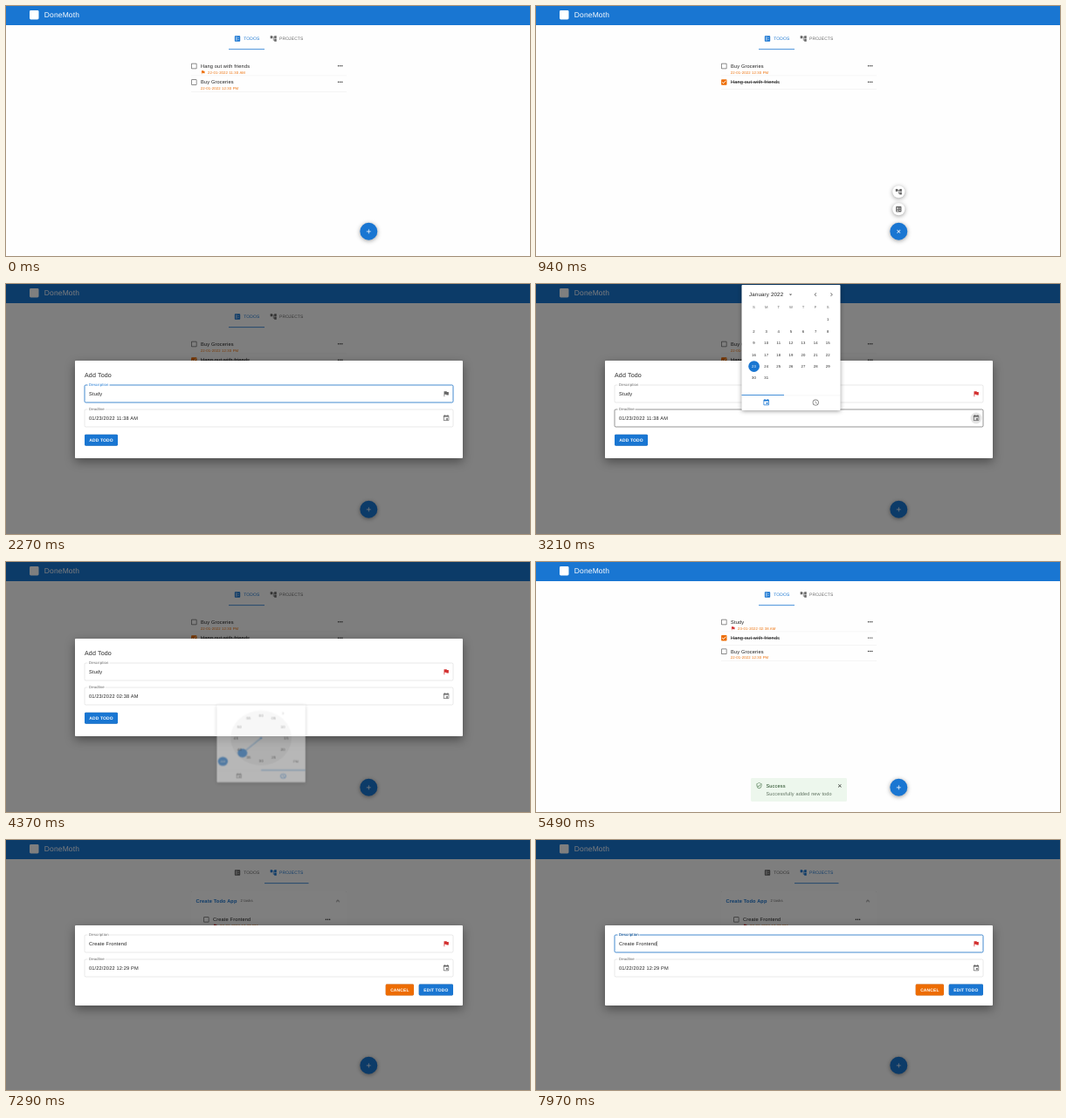
Animation, 600 px wide and 287 px high, one loop 8000 ms. Source, as an HTML page:

```html
<!DOCTYPE html>
<html lang="en">
<head>
<meta charset="utf-8">
<title>Todo app demo</title>
<style>
html, body { margin: 0; width: 100%; height: 100%; overflow: hidden; background: #fefefe; }
svg { display: block; width: 100vw; height: 100vh; font-family: "Liberation Sans", Arial, sans-serif; letter-spacing: .0094em; text-rendering: geometricPrecision; }
.caps { letter-spacing: .0286em; }
.small { letter-spacing: .033em; }
.card { filter: drop-shadow(0 .5px .7px rgba(0,0,0,.3)); }
.float { filter: drop-shadow(0 1.5px 2.5px rgba(0,0,0,.4)); }
.modal { filter: drop-shadow(0 4px 6px rgba(0,0,0,.4)); }
</style>
</head>
<body>
<svg id="stage" viewBox="0 0 600 287"></svg>
<script>
const LOOP = 8000;
const BLUE = '#1976d2', ORANGE = '#ed6c02', RED = '#d32f2f';
const INK = 'rgba(0,0,0,.87)', GREY = 'rgba(0,0,0,.6)', LINE = 'rgba(0,0,0,.23)';

const ICONS = {
  ballot: 'M13 9.5h5v-2h-5zm0 7h5v-2h-5zm6 4.5H5a2 2 0 01-2-2V5a2 2 0 012-2h14a2 2 0 012 2v14a2 2 0 01-2 2zM6 11h5V6H6zm1-4h3v3H7zM6 18h5v-5H6zm1-4h3v3H7z',
  tree: 'M22 11V3h-7v3H9V3H2v8h7V8h2v10h4v3h7v-8h-7v3h-2V8h2v3z',
  flag: 'M14.4 6 14 4H5v17h2v-7h5.6l.4 2h7V6z',
  event: 'M17 12h-5v5h5zM16 1v2H8V1H6v2H5a2 2 0 00-2 2v14a2 2 0 002 2h14a2 2 0 002-2V5a2 2 0 00-2-2h-1V1zm3 18H5V8h14z',
  clock: 'M12 2a10 10 0 100 20 10 10 0 000-20zm0 18a8 8 0 110-16 8 8 0 010 16zm.5-13H11v6l5.25 3.15.75-1.23-4.5-2.67z',
  edit: 'M3 17.25V21h3.75L17.81 9.94l-3.75-3.75zM20.71 7.04a1 1 0 000-1.41l-2.34-2.34a1 1 0 00-1.41 0l-1.83 1.83 3.75 3.75z',
  trash: 'M6 19a2 2 0 002 2h8a2 2 0 002-2V7H6zM19 4h-3.5l-1-1h-5l-1 1H5v2h14z',
  plus: 'M19 13h-6v6h-2v-6H5v-2h6V5h2v6h6z',
  box: 'M19 5v14H5V5h14m0-2H5a2 2 0 00-2 2v14a2 2 0 002 2h14a2 2 0 002-2V5a2 2 0 00-2-2z',
  checked: 'M19 3H5a2 2 0 00-2 2v14a2 2 0 002 2h14a2 2 0 002-2V5a2 2 0 00-2-2zm-9 14l-5-5 1.41-1.41L10 14.17l7.59-7.59L19 8z',
  shield: 'M12 1 3 5v6c0 5.6 3.8 10.7 9 12 5.2-1.3 9-6.4 9-12V5zm7 10c0 4.5-3 8.7-7 9.9-4-1.2-7-5.4-7-9.9V6.3l7-3.1 7 3.1zM7.4 11.6 6 13l4 4 8-8-1.4-1.4L10 14.2z',
  more: 'M6 10a2 2 0 100 4 2 2 0 000-4zm12 0a2 2 0 100 4 2 2 0 000-4zm-6 0a2 2 0 100 4 2 2 0 000-4z',
  chevron: 'M7.4 8.6 12 13.2l4.6-4.6L18 10l-6 6-6-6z',
  drop: 'M7 10l5 5 5-5z',
  close: 'M19 6.4 17.6 5 12 10.6 6.4 5 5 6.4l5.6 5.6L5 17.6 6.4 19l5.6-5.6 5.6 5.6 1.4-1.4-5.6-5.6z'
};

// All positions are centres for icons, left/centre-line for text.
const icon = (name, x, y, fill = GREY, size = 8.47, turn = 0, cls = '') =>
  `<path class="${cls}" d="${ICONS[name]}" fill="${fill}" transform="translate(${x} ${y}) rotate(${turn}) scale(${size / 24}) translate(-12 -12)"/>`;
const text = (str, x, y, size = 5.65, fill = INK, attrs = '') =>
  `<text x="${x}" y="${y + size * .35}" font-size="${size}" fill="${fill}" ${attrs}>${str}</text>`;
const mid = 'text-anchor="middle"', bold = 'font-weight="bold"', caps = 'class="caps"';
const rect = (x, y, w, h, fill, attrs = '') =>
  `<rect x="${x}" y="${y}" width="${w}" height="${h}" fill="${fill}" ${attrs}/>`;
const disc = (x, y, r, fill, attrs = '') => `<circle cx="${x}" cy="${y}" r="${r}" fill="${fill}" ${attrs}/>`;
const group = (cls, ...parts) => `<g class="${cls}">${parts.join('')}</g>`;

// Keyframes keyed by milliseconds; each track becomes a class of the same name.
const rules = [];
function track(name, stops, ease = 'linear') {
  const times = Object.keys(stops);
  if (!stops[LOOP]) stops[LOOP] = stops[times[times.length - 1]];
  const frames = Object.entries(stops).map(([ms, css]) => `${ms * 100 / LOOP}%{${css}}`).join('');
  rules.push(`@keyframes ${name}{${frames}}.${name}{animation:${name} ${LOOP}ms ${ease} infinite}`);
}
const during = (name, from, to = LOOP) => track(name, {
  0: `opacity:${from ? 0 : 1}`, [from]: 'opacity:1', [to]: `opacity:${to < LOOP ? 0 : 1}`
}, 'step-end');
const fade = (name, a, b, c = LOOP, d = LOOP) => track(name, {
  0: 'opacity:0', [a]: 'opacity:0', [b]: 'opacity:1', [c]: 'opacity:1', [d]: `opacity:${c < LOOP ? 0 : 1}`
});

during('todos', 0, 5620);
during('projects', 5620);
track('underline', { 0: 'x:255px;width:41px', 5620: 'x:255px;width:41px', 5780: 'x:296px;width:50.5px' }, 'ease-in-out');
during('listStart', 0, 90);
during('listChecked', 90, 280);
during('listSorted', 280, 4880);
during('listAdded', 4880);
fade('snack', 4960, 5130, 5530, 5600);

const OPEN = 'transform:scale(1)', SHUT = 'transform:scale(0)';
track('spin', { 0: 'transform:rotate(0)', 560: 'transform:rotate(0)', 720: 'transform:rotate(45deg)', 1290: 'transform:rotate(45deg)', 1470: 'transform:rotate(0)' });
track('dialTodo', { 0: SHUT, 560: SHUT, 700: OPEN, 1330: OPEN, 1470: SHUT });
track('dialProject', { 0: SHUT, 610: SHUT, 770: OPEN, 1260: OPEN, 1410: SHUT });

track('backdrop', {
  0: 'opacity:0', 1240: 'opacity:0', 1370: 'opacity:.37', 1470: 'opacity:.5', 4710: 'opacity:.5',
  4900: 'opacity:0', 6990: 'opacity:0', 7220: 'opacity:.5'
});
fade('addDialog', 1230, 1365, 4710, 4890);
fade('editDialog', 6990, 7210);
const REST = 'transform:translate(95px,128px) scale(1)', LIFT = 'transform:translate(95px,117.2px) scale(.75)';
track('label', {
  0: `${REST};fill:${GREY}`, 1560: `${REST};fill:${GREY}`, 1700: `${LIFT};fill:${BLUE}`,
  2390: `${LIFT};fill:${BLUE}`, 2420: `${LIFT};fill:${GREY}`
});
during('notch', 1620);
during('focusAdd', 1560, 2400);
during('focusEdit', 7600);
during('caretStart', 1600, 1720);
during('caretEnd', 1930, 2100);
const TYPED = [1720, 1760, 1820, 1870, 1930, LOOP];
TYPED.slice(0, -1).forEach((ms, i) => during(`typed${i}`, ms, TYPED[i + 1]));
track('priority', { 0: `fill:${GREY}`, 2560: `fill:${RED}` }, 'step-end');
during('picking', 2900, 4290);
during('timeOld', 0, 3900);
during('timeNew', 3900);

const TINY = 'opacity:0;transform:scale(.75,.5625)', FULL = 'opacity:1;transform:scale(1)';
track('calendar', { 0: TINY, 3080: TINY, 3200: FULL, 3639: FULL, 3640: TINY });
track('clock', { 0: TINY, 3639: TINY, 3640: FULL, 4300: FULL, 4370: 'opacity:.45;transform:scale(.9,.81)', 4470: TINY });
during('hours', 3640, 4060);
during('minutes', 4060, 4500);
track('hand', { 0: 'transform:rotate(330deg)', 3900: 'transform:rotate(60deg)', 4060: 'transform:rotate(228deg)' }, 'step-end');

const UNFOLD = 'cubic-bezier(.4,0,.2,1)';
track('cardFold', { 0: 'height:17px', 5820: 'height:17px', 6120: 'height:96px' }, UNFOLD);
track('headShift', { 0: 'transform:translateY(-2.8px)', 5820: 'transform:translateY(-2.8px)', 6120: 'transform:none' }, UNFOLD);
track('nextShift', { 0: 'transform:translateY(-84px)', 5820: 'transform:translateY(-84px)', 6120: 'transform:none' }, UNFOLD);
const DOWN = 'transform:rotate(0)', UP = 'transform:rotate(180deg)';
track('flip', { 0: DOWN, 5820: DOWN, 6000: UP });
during('hoverMore', 6260, 6940);
track('menu', { 0: TINY, 6460: TINY, 6555: FULL, 6940: FULL, 7010: TINY });

rules.push(
  '.spin{transform-origin:415.3px 258.8px}', '.dialTodo{transform-origin:415.3px 233.3px}',
  '.dialProject{transform-origin:415.3px 213.3px}', '.calendar{transform-origin:292px 144px}',
  '.clock{transform-origin:292px 164px}', '.hand{transform-origin:292px 211px}',
  '.flip{transform-origin:380px 70px}', '.menu{transform-origin:400px 98px}'
);

const due = (x, y, date, flag) => (flag ? icon('flag', x + 2.8, y, flag, 5.6) : '') +
  text(date, flag ? x + 8.3 : x, y, 4.24, ORANGE, 'class="small"');

function task(x, y, name, { done, flag, date, moreX = 382.7 } = {}) {
  const struck = done ? rect(x + 7.7, y - .1, 54.4, .45, INK) : '';
  return icon(done ? 'checked' : 'box', x, y, done ? ORANGE : GREY) + text(name, x + 7.7, y) + struck +
    (date ? due(x + 7.5, y + 7.2, date, flag) : '') + icon('more', moreX, y - .2, INK);
}
const divider = y => rect(212, y, 178, .35, 'rgba(0,0,0,.1)');
const BUY = { date: '22-01-2022 12:30 PM' };
const todo = (y, name, opts) => task(215.3, y, name, opts) + divider(y + (opts.done ? 8 : 10.8));
const hang = (y, opts) => todo(y, 'Hang out with friends', opts);
const buy = y => todo(y, 'Buy Groceries', BUY);

function tabs(active) {
  const tint = i => i === active ? BLUE : GREY;
  return icon('ballot', 265, 37.5, tint(0)) + text('TODOS', 272.2, 37.5, 4.94, tint(0), caps) +
    icon('tree', 306.2, 37.5, tint(1)) + text('PROJECTS', 313, 37.5, 4.94, tint(1), caps);
}

const header = rect(0, 0, 600, 22, BLUE, 'class="card"') + rect(27, 5, 10.5, 10.5, '#fff', 'rx="1.4"') +
  text('DoneMoth', 43.8, 10.3, 8.47, '#fff');

const todosPage = group('todos', tabs(0),
  group('listStart', hang(69, { flag: ORANGE, date: '22-01-2022 11:30 AM' }), buy(87.5)),
  group('listChecked', hang(69, { done: true }), buy(84.5)),
  group('listSorted', buy(69), hang(87.5, { done: true })),
  group('listAdded', todo(69, 'Study', { flag: RED, date: '23-01-2022 02:38 AM' }),
    hang(87.3, { done: true }), buy(102.7)));

const cardHead = (y, name, count, countX) =>
  text(name, 217.5, y, 5.65, BLUE, bold) + text(count, countX, y, 4.24, GREY, 'class="small"');

const projectsPage = group('projects', tabs(1),
  rect(212, 59, 178, 96, '#fff', 'class="card cardFold" rx="1"'),
  group('headShift', cardHead(70, 'Create Todo App', '2 tasks', 268.5), group('flip', icon('chevron', 380, 70))),
  `<clipPath id="fold"><rect class="cardFold" x="212" y="59" width="178" height="96"/></clipPath>`,
  '<g clip-path="url(#fold)">', disc(368.5, 91.2, 5.5, 'rgba(0,0,0,.06)', 'class="hoverMore"'),
  task(229.3, 91.4, 'Create Frontend', { flag: RED, date: '22-01-2022 12:29 PM', moreX: 368.5 }),
  task(229.3, 118.2, 'Create Backend', { flag: ORANGE, date: '22-01-2022 02:41 PM', moreX: 368.5 }),
  icon('plus', 221.7, 144.8, GREY, 7.5), text('Add task', 228.5, 144.8, 4.94, GREY),
  icon('edit', 339.3, 144.9, GREY, 6.5), text('Edit', 344, 144.8, 4.94, GREY),
  icon('trash', 361.7, 144.9, RED, 6.5), text('Delete', 366.3, 144.8, 4.94, RED), '</g>',
  group('nextShift', rect(212, 160.5, 178, 17, '#fff', 'class="card" rx="1"'),
    cardHead(169, 'Edit Video', '1 tasks', 251.5), icon('chevron', 380, 169)));

const menu = group('menu', rect(361, 98, 39.5, 34.5, '#fff', 'class="float" rx="1"'),
  icon('edit', 370.7, 109.7, BLUE, 7), text('Edit', 379.8, 109.6, 5.2),
  icon('trash', 370.7, 121, GREY, 7), text('Delete', 379.8, 120.9, 5.2));

const snack = group('snack', rect(246, 248, 110, 27, '#edf7ed', 'rx="1.4"'),
  icon('shield', 255.5, 256.7, '#4f7a52', 7.8), text('Success', 263.4, 256.7, 5.65, '#1e4620'),
  icon('close', 347.8, 256.8, INK, 6.5), text('Successfully added new todo', 263.4, 266.2, 5.5, '#5c6f5d'));

const mini = (cls, name, y) => group(cls, disc(415.3, y, 7.06, '#fff', 'class="float"'), icon(name, 415.3, y));
const fab = mini('dialProject', 'tree', 213.3) + mini('dialTodo', 'ballot', 233.3) +
  disc(415.3, 258.8, 10, BLUE, 'class="float"') + group('spin', icon('plus', 415.3, 258.8, '#fff'));

const outline = (y, stroke, cls = '', w = .4) =>
  rect(90, y, 422, 20, 'none', `class="${cls}" stroke="${stroke}" stroke-width="${w}" rx="1.4"`);
const gap = (y, w, cls = '') => rect(93.5, y - 1, w, 2, '#fff', `class="${cls}"`);
const tag = (str, y, fill = GREY, cls = '') => text(str, 95, y, 4.24, fill, `class="${cls}"`);
const caret = (x, y, cls) => rect(x, y - 3, .4, 6, INK, `class="${cls}"`);
const button = (str, x, y, w, fill) => rect(x, y, w, 13, fill, 'class="card" rx="1.4"') +
  text(str, x + w / 2, y + 6.5, 4.94, '#fff', `${mid} ${bold} ${caps}`);

const addDialog = group('addDialog', rect(79, 88, 444, 112, '#fff', 'class="modal" rx="1"'),
  text('Add Todo', 90, 104.8, 7.06),
  outline(116, LINE), outline(116, BLUE, 'focusAdd', .75), gap(116, 25, 'notch'),
  '<text class="label" font-size="5.65">Description</text>',
  ...[...'Study'].map((_, i) => text('Study'.slice(0, i + 1), 95, 126, 5.65, INK, `class="typed${i}"`)),
  caret(95, 126, 'caretStart'), caret(109.8, 126, 'caretEnd'),
  icon('flag', 504, 126, GREY, 8.47, 0, 'priority'),
  outline(144, LINE), outline(144, INK, 'picking'), gap(144, 20), tag('Deadline', 144),
  text('01/23/2022 11:38 AM', 95, 154.2, 5.65, INK, 'class="timeOld"'),
  text('01/23/2022 02:38 AM', 95, 154.2, 5.65, INK, 'class="timeNew"'),
  disc(504, 154, 6.5, 'rgba(0,0,0,.1)', 'class="picking"'), icon('event', 504, 154),
  button('ADD TODO', 90, 172.7, 38, BLUE));

const editDialog = group('editDialog', rect(79, 98, 444, 92, '#fff', 'class="modal" rx="1"'),
  outline(109, LINE), outline(109, BLUE, 'focusEdit', .75), gap(109, 25),
  tag('Description', 109), tag('Description', 109, BLUE, 'focusEdit'),
  text('Create Frontend', 95, 119), caret(138, 119, 'focusEdit'), icon('flag', 504, 119, RED),
  outline(137, LINE), gap(137, 20), tag('Deadline', 137),
  text('01/22/2022 12:29 PM', 95, 147.2), icon('event', 504, 147),
  button('CANCEL', 434.7, 165.5, 32.3, ORANGE), button('EDIT TODO', 472.7, 165.5, 39.3, BLUE));

const DAY_W = 14.12, WEEK_H = 13.4;
const days = Array.from({ length: 31 }, (_, i) => {
  const slot = i + 6, x = 249.6 + slot % 7 * DAY_W, y = 41 + Math.floor(slot / 7) * WEEK_H;
  const chosen = i === 22;
  return (chosen ? disc(x, y, 6.35, BLUE) : '') + text(i + 1, x, y, 4.24, chosen ? '#fff' : INK, mid);
});
const calendar = group('calendar', rect(235.5, 1, 113, 144, '#fff', 'class="float" rx="1"'),
  text('January 2022', 244, 12.2, 6.2), icon('drop', 291.5, 12.2),
  icon('chevron', 320, 12.2, GREY, 8.47, 90), icon('chevron', 338.4, 12.2, GREY, 8.47, -90),
  ...[...'SMTWTFS'].map((d, i) => text(d, 249.6 + i * DAY_W, 26.6, 4.24, GREY, mid)), ...days,
  rect(235.5, 127.8, 113, .3, 'rgba(0,0,0,.12)'), rect(235.5, 127.2, 48.5, .8, BLUE),
  icon('event', 263.7, 136, BLUE), icon('clock', 320.2, 136));

const dialNumbers = label => Array.from({ length: 12 }, (_, i) => {
  const a = i * Math.PI / 6;
  return text(label(i), 292 + 32 * Math.sin(a), 211 - 32 * Math.cos(a), 5, INK, mid);
}).join('');
const clock = group('clock', rect(235.5, 164, 113, 110, '#fff', 'class="float" rx="1"'),
  disc(292, 211, 38.8, 'rgba(0,0,0,.07)'),
  group('hand', rect(291.6, 182, .8, 29, BLUE), disc(292, 179, 6.2, BLUE)), disc(292, 211, 1.1, BLUE),
  group('hours', dialNumbers(i => i || 12)),
  group('minutes', dialNumbers(i => String(i * 5).padStart(2, '0'))),
  icon('chevron', 320, 176, GREY, 7, -90),
  disc(243.3, 244, 6.35, BLUE), text('AM', 243.3, 244, 4.24, '#fff', mid), text('PM', 336.5, 244, 4.24, INK, mid),
  rect(235.5, 257, 113, .3, 'rgba(0,0,0,.12)'), rect(292, 256.4, 56.5, .8, BLUE),
  icon('event', 263.7, 265), icon('clock', 320.2, 265, BLUE));

document.head.appendChild(document.createElement('style')).textContent = rules.join('\n');
document.getElementById('stage').innerHTML = [
  rect(0, 0, 600, 287, '#fefefe'), header, todosPage, projectsPage,
  rect(255, 49.3, 41, .8, BLUE, 'class="underline"'), snack, fab, menu,
  rect(0, 0, 600, 287, '#000', 'class="backdrop"'), addDialog, editDialog, calendar, clock
].join('');
</script>
</body>
</html>
```
